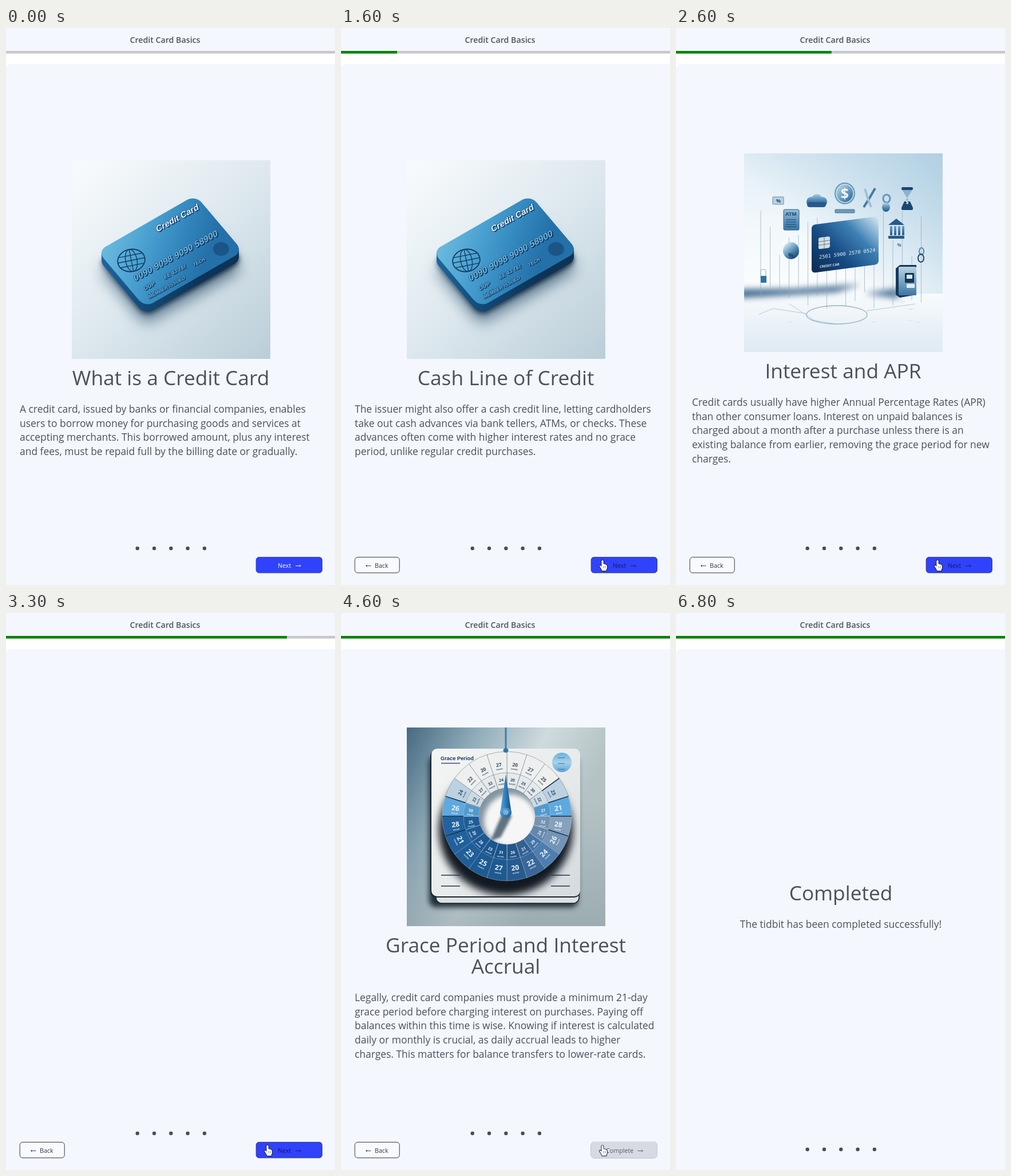
Write an HTML page with a canvas that moves like this. It is 575 by 973 pixels and loops after 7600 ms.

```html
<!DOCTYPE html>
<html lang="en">
<head>
<meta charset="utf-8">
<title>Credit Card Basics</title>
<style>
  html, body { margin: 0; width: 100%; height: 100%; overflow: hidden; background: #f4f7fe; }
  canvas { display: block; }
</style>
</head>
<body>
<canvas id="stage" width="575" height="973"></canvas>
<script>
const ctx = document.getElementById('stage').getContext('2d');
const LOOP = 7600, SIZE = 347, MID = 288, NAV = 28;
const INK = '#4c5159', PAGE = '#f4f7fe', NAVY = '#1a4672';
const SANS = '"Open Sans", "Noto Sans", sans-serif';
const BOLD = '"Liberation Sans", Arial, sans-serif';

const clamp = v => Math.max(0, Math.min(1, v));
const mix = (a, b, p) => a + (b - a) * p;
const ease = p => (1 - Math.cos(Math.PI * p)) / 2;
const span = (t, a, b) => clamp((t - a + 45) / (b - a + 45));

function seeded(seed) {
  return () => (seed = seed * 16807 % 2147483647) / 2147483647;
}
function text(g, s, x, y, font, color, align = 'left') {
  g.font = font;
  g.fillStyle = color;
  g.textAlign = align;
  g.fillText(s, x, y);
}
function grad(g, x0, y0, x1, y1, ...colors) {
  const f = g.createLinearGradient(x0, y0, x1, y1);
  colors.forEach((c, i) => f.addColorStop(i / (colors.length - 1), c));
  return f;
}
function paint(g, fill, stroke, width = 1) {
  if (fill) { g.fillStyle = fill; g.fill(); }
  if (stroke) { g.strokeStyle = stroke; g.lineWidth = width; g.stroke(); }
}
function trace(g, p) {
  g.beginPath();
  for (let i = 0; i < p.length; i += 2) g.lineTo(p[i], p[i + 1]);
}
function poly(g, fill, ...p) {
  trace(g, p);
  paint(g, fill);
}
function line(g, color, width, ...p) {
  trace(g, p);
  paint(g, null, color, width);
}
function oval(g, x, y, rx, ry, fill, stroke, width, turn = 0) {
  g.beginPath();
  g.ellipse(x, y, rx, ry, turn, 0, 7);
  paint(g, fill, stroke, width);
}
function box(g, x, y, w, h, r, fill, stroke, width) {
  g.beginPath();
  g.roundRect(x, y, w, h, r);
  paint(g, fill, stroke, width);
}
function at(g, x, y, draw, turn = 0) {
  g.save();
  g.translate(x, y);
  g.rotate(turn);
  draw();
  g.restore();
}
function blurred(g, px, draw) {
  g.save();
  g.filter = `blur(${px}px)`;
  draw();
  g.restore();
}

// Each picture is painted once, in its own square.
function picture(draw) {
  const c = document.createElement('canvas');
  c.width = c.height = SIZE;
  draw(c.getContext('2d'));
  return c;
}

function cardArt(g) {
  g.fillStyle = grad(g, 15, 14, 330, SIZE, '#f7fafc', '#dde8ee', '#bccfd9');
  g.fillRect(0, 0, SIZE, SIZE);

  // Card plane: x runs up to the right, y down to the right.
  const onCard = (dy, draw) => at(g, 45, 159 + dy, () => {
    g.transform(.855, -.49, .692, .817, 0, 0);
    draw();
  });
  const plate = (dy, ...colors) =>
    onCard(dy, () => box(g, 0, 0, 200, 120, 16, grad(g, 20, 0, 110, 125, ...colors)));
  blurred(g, 12, () => plate(32, 'rgba(40,84,116,.5)', 'rgba(20,56,88,.6)'));
  blurred(g, 4, () => plate(17, 'rgba(8,30,52,.5)', 'rgba(6,24,42,.85)'));
  for (let d = 13; d > 0; d--) plate(d, '#1d659c', '#0c3358');
  plate(0, '#68b8de', '#4ba2d1', '#3388be', '#2470a9');

  const emboss = (s, x, y, size, color = '#6fb2d9') => at(g, x, y, () => {
    g.transform(.87, -.48, .25, .95, 0, 0);
    text(g, s, 1.5, 2, `bold ${size}px ${BOLD}`, '#0c3159');
    g.lineWidth = 1.2;
    g.strokeStyle = '#164a78';
    g.strokeText(s, 0, 0);
    text(g, s, 0, 0, `bold ${size}px ${BOLD}`, color);
  });
  emboss('Credit Card', 149, 126, 15.5, '#eef7fc');
  emboss('0090 9098 9090 58900', 110, 212, 16.3);
  emboss('OUP', 127, 228, 10);
  emboss('EE 43 TEI', 162, 208, 9.5);
  emboss('TECH', 213, 186, 8.5);
  emboss('MEMBER ISSUED', 135, 242, 8.6);

  at(g, 104, 175, () => {
    const rim = '#123d66';
    oval(g, 0, 0, 24, 19.5, null, rim, 1.8);
    oval(g, 0, 0, 10, 19.5, null, rim, 1.4);
    line(g, rim, 1.4, 0, -19, 0, 19);
    for (const y of [-9, 0, 9]) {
      const w = 24 * Math.sqrt(1 - (y / 19.5) ** 2);
      line(g, rim, 1.4, -w, y, w, y);
    }
  }, -.2);
  oval(g, 261, 155, 14, 12, '#1b5587');
}

function feesArt(g) {
  const rand = seeded(11);
  g.fillStyle = grad(g, 0, 0, 0, SIZE, '#e2eef6', '#f1f7fb', '#fbfdfe', '#dfeaf3');
  g.fillRect(0, 0, SIZE, SIZE);
  g.fillStyle = grad(g, 150, 190, SIZE, 0, 'rgba(178,209,228,0)', '#b0d0e3');
  g.fillRect(0, 0, SIZE, 245);
  blurred(g, 6, () => {
    poly(g, 'rgba(28,78,122,.9)', -8, 238, 90, 237, 205, 229, 160, 242, -8, 252);
    poly(g, 'rgba(28,78,122,.8)', 210, 245, 270, 236, 270, 253);
  });

  for (let x = 29; x < 310; x += 16.5) line(g, '#8fa9ba', .7, x, 100 + 90 * rand(), x, 230 + 50 * rand());
  oval(g, 162, 282, 53, 16, null, '#8fb6c8', 1.3);
  line(g, '#a9bdca', .8, 26, 281, 51, 271, 109, 280);
  line(g, '#a9bdca', .8, 79, 263, 124, 292, 161, 298);
  line(g, '#a9bdca', .8, 214, 275, 299, 263);
  for (let i = 0; i < 8; i++)
    text(g, '· · ·', 30 + 270 * rand(), 260 + 45 * rand(), `6px ${SANS}`, '#587d98');

  const steel = (y, h) => grad(g, 0, y, 0, y + h, '#b8d6e8', '#4d88b5', NAVY);
  const sign = (s, size, color) => text(g, s, 0, size * .36, `bold ${size}px ${SANS}`, color, 'center');
  const rows = (n, y, w) => { for (let i = 0; i < n; i++) line(g, NAVY, 1.1, -w, y + i * 4, w, y + i * 4); };

  at(g, 60, 83, () => { box(g, -10, -7, 19, 13, 1, '#b9d2e0', '#5f8fae'); sign('%', 9, NAVY); });
  at(g, 82, 116, () => {
    box(g, -13, -18, 27, 36, 2, steel(-30, 75), '#2f6591');
    rows(4, 0, 9);
    g.translate(0, -10);
    sign('ATM', 9, NAVY);
  });
  at(g, 127, 83, () => {
    for (const x of [-9, 0, 9]) oval(g, x, 2 - 5 * Math.cos(x / 6), 9, 9, steel(-14, 26));
    box(g, -17, 2, 33, 9, 4.5, '#255b8b');
  });
  at(g, 82, 170, () => {
    oval(g, 0, 0, 14, 15, grad(g, -11, -13, 11, 13, '#e3eff5', '#5d97c0', '#123a64'));
    g.translate(0, 8);
    sign('%', 10, '#173e63');
  });
  at(g, 176, 70, () => {
    oval(g, 0, 0, 18, 19, '#6498bb');
    oval(g, 0, 0, 15, 16, grad(g, -13, -13, 13, 13, '#b7d5e7', '#2b6a9d'), '#d4e7f1', 1.5);
    sign('$', 25, '#f3f9fc');
    box(g, -17, 28, 34, 6, 1, '#6d99b7', '#44779d');
  });
  at(g, 218, 78, () => {
    line(g, '#47799f', 4, -9, 16, 0, 2, 11, -17);
    line(g, '#9dc2d8', 4, -7, -16, -2, 0, 4, 16);
  });
  at(g, 249, 86, () => { oval(g, 0, -7, 6, 7, null, '#6797b7', 3); oval(g, -1, 8, 7, 8, steel(0, 18)); });
  at(g, 285, 78, () => {
    poly(g, '#8bb3cc', -10, -16, 10, -16, 0, 0, 10, 18, -10, 18, 0, 0);
    poly(g, NAVY, -5, 6, 5, 6, 10, 17, -10, 17);
    for (const y of [-19, 16]) box(g, -10, y, 20, 5, 2, NAVY);
    g.translate(0, 8);
    sign('$', 9, '#eff7fb');
  });
  at(g, 266, 132, () => {
    poly(g, '#255a8a', -14, -7, 0, -18, 14, -7);
    for (let x = -11; x < 12; x += 7) box(g, x, -5, 4, 16, 0, steel(-16, 32));
    box(g, -14, 12, 28, 5, 1, '#255a8a');
    g.translate(5, 28);
    sign('%', 8, '#4d7594');
  });
  at(g, 309, 177, () => { oval(g, 1, -6, 4, 6, null, '#5188ae', 2); oval(g, 0, 6, 5, 7, null, NAVY, 2); });
  at(g, 34, 219, () => { box(g, -5, -16, 9, 17, 2, null, '#8db1c6'); box(g, -5, -5, 10, 12, 1, '#2f70a1'); });
  at(g, 284, 223, () => {
    poly(g, '#143659', -19, -22, -12, -28, 17, -28, 17, 24, -12, 29, -19, 24);
    box(g, -14, -25, 31, 50, 2, grad(g, 0, -25, 0, 25, '#b7d4e4', '#3f76a3'));
    box(g, -3, -14, 16, 17, 1, '#123657');
    box(g, 0, -11, 10, 7, 0, '#dceaf2');
    box(g, 0, 5, 14, 7, 1, '#e1edf4');
  });

  at(g, 118, 125, () => {
    g.transform(1, -.13, 0, 1, 0, 0);
    box(g, 0, 0, 117, 84, 6, grad(g, 10, 84, 110, -5, '#0d2f57', '#164a82', '#3d80b4', '#d3e8f3'));
    box(g, 12, 24, 20, 20, 3, '#d5dfe4');
    for (const y of [31, 37]) line(g, '#647c8d', 1, 12, y, 32, y);
    line(g, '#647c8d', 1, 22, 24, 22, 44);
    text(g, '2501 5900 2570 0524', 13, 61, '8.6px "DejaVu Sans Mono", monospace', '#eaf3f9');
    text(g, 'CREDIT CAR', 14, 77, `bold 6px ${SANS}`, '#dcebf5');
  });
}

function wheelTone(a) {
  const c = Math.cos(a), s = Math.sin(a);
  if (c > .55) return '#eef0ef';
  if (c > 0) return `hsl(205 ${mix(80, 35, c * 2)}% ${mix(52, 84, c * 2)}%)`;
  if (s < 0) return `hsl(209 66% ${34 + 4 * s * s}%)`;
  return `hsl(210 ${62 - 34 * s}% ${35 + 29 * s * s}%)`;
}

function wheelArt(g) {
  const cx = 175, cy = 155, count = 20, step = 2 * Math.PI / count;
  const rule = '#1c3550';
  g.fillStyle = grad(g, 0, 0, 300, 150, '#466a81', '#8fabb9', '#cfdadd', '#b4c2c5');
  g.fillRect(0, 0, SIZE, SIZE);
  g.fillStyle = grad(g, 0, 130, 0, SIZE, 'rgba(120,140,148,0)', 'rgba(120,140,148,.4)');
  g.fillRect(0, 0, SIZE, SIZE);

  blurred(g, 5, () => box(g, 39, 50, 260, 264, 12, 'rgba(10,25,36,.85)'));
  box(g, 51, 50, 250, 257, 10, '#dce2e4', '#17242e', 1.5);
  box(g, 41, 40, 262, 257, 10, '#19262f');
  g.save();
  box(g, 43, 37, 260, 258, 10, grad(g, 43, 37, 303, 295, '#f4f5f5', '#e9ecec', '#d4dadd'));
  g.clip();
  blurred(g, 7, () => oval(g, cx - 2, cy + 24, 117, 114, 'rgba(8,14,24,.95)'));
  g.restore();
  for (const y of [258, 277])
    for (const x of [60, 252]) line(g, rule, 1.5, x, y, x + 33, y);
  text(g, 'Grace Period', 59, 57, `bold 9.3px ${BOLD}`, '#1b3458');
  line(g, '#2c507c', 1.6, 60, 62.5, 93, 62.5);
  oval(g, 271, 61, 17, 17, grad(g, 0, 44, 0, 78, '#6bb3de', '#a6d2ea', '#5da6d6'));
  for (const y of [53, 63, 73]) line(g, '#225a8b', .8, 264, y, 276, y);

  const cell = (k, r0, r1, fill, stroke) => {
    const a = k * step - Math.PI / 2;
    g.beginPath();
    g.arc(cx, cy, r1, a, a + step);
    g.arc(cx, cy, r0, a + step, a, true);
    g.closePath();
    paint(g, fill, stroke, .8);
  };
  const label = (s, a, r, turn, size, color) =>
    at(g, cx + r * Math.sin(a), cy - r * Math.cos(a), () => {
      text(g, s, 0, size * .36, `bold ${size}px ${SANS}`, color, 'center');
      text(g, 'month', 0, size * .36 + 6, `bold 3.5px ${SANS}`, color, 'center');
    }, turn);
  for (let k = 0; k < count; k++) {
    const a = (k + .5) * step, c = Math.cos(a), s = Math.sin(a), pale = c > .4;
    const edge = pale ? '#8d989f' : 'rgba(225,238,248,.4)';
    cell(k, 49, 113, wheelTone(a), edge);
    cell(k, 49, 76, pale ? 'rgba(222,228,231,.5)' : 'rgba(14,60,108,.14)', edge);
    // Keep every number readable: radial above and below, level at the sides.
    const turn = Math.abs(c) < .35 ? a - Math.sign(s) * Math.PI / 2 : c < 0 ? a - Math.PI : a;
    const color = pale ? '#34465a' : '#eaf4fb';
    label(20 + k * 7 % 9, a, 91, turn, pale ? 8.5 : 12, color);
    label(20 + k * 5 % 13, a, 64, turn, 7, color);
    if (Math.abs(c) < .65) {
      const x = Math.sin(k * step), y = -Math.cos(k * step);
      if (y < .4) line(g, '#14283c', 1.4, cx + 76 * x, cy + 76 * y, cx + 113 * x, cy + 113 * y);
    }
  }

  g.save();
  oval(g, cx, cy, 49, 49, '#8496a1');
  g.clip();
  blurred(g, 4, () => oval(g, cx + 6, cy + 8, 46, 46, '#f5f6f5'));
  blurred(g, 2, () => poly(g, 'rgba(70,90,106,.85)', 167, 150, 184, 154, 164, 192, 146, 198));
  g.restore();
  line(g, '#3a7eb3', 3, 173, 0, 173, 40);
  oval(g, 173, 40, 4.5, 4, '#2f75ad');
  poly(g, grad(g, 164, 0, 183, 0, '#58a5d7', '#2c78b6', '#174d83'), 173, 82, 183, 150, 163, 150);
  oval(g, 173, 149, 10, 9, grad(g, 165, 140, 181, 158, '#62abd9', '#1c5b96'));
  oval(g, 173, 148, 5, 4.5, '#71b3dd');
}

const card = picture(cardArt);
const slides = [
  { in: [-900, -800], out: [600, 700], gain: 0, art: card,
    title: ['What is a Credit Card'],
    body: ['A credit card, issued by banks or financial companies, enables',
      'users to borrow money for purchasing goods and services at',
      'accepting merchants. This borrowed amount, plus any interest',
      'and fees, must be repaid full by the billing date or gradually.'] },
  { in: [1000, 1600], out: [2000, 2100], gain: 98, art: card,
    title: ['Cash Line of Credit'],
    body: ['The issuer might also offer a cash credit line, letting cardholders',
      'take out cash advances via bank tellers, ATMs, or checks. These',
      'advances often come with higher interest rates and no grace',
      'period, unlike regular credit purchases.'] },
  { in: [2300, 3000], out: [3300, 3300], gain: 393, art: picture(feesArt),
    title: ['Interest and APR'],
    body: ['Credit cards usually have higher Annual Percentage Rates (APR)',
      'than other consumer loans. Interest on unpaid balances is',
      'charged about a month after a purchase unless there is an',
      'existing balance from earlier, removing the grace period for new',
      'charges.'] },
  { in: [3600, 4100], out: [6000, 6000], gain: 84, art: picture(wheelArt),
    title: ['Grace Period and Interest', 'Accrual'],
    body: ['Legally, credit card companies must provide a minimum 21-day',
      'grace period before charging interest on purchases. Paying off',
      'balances within this time is wise. Knowing if interest is calculated',
      'daily or monthly is crucial, as daily accrual leads to higher',
      'charges. This matters for balance transfers to lower-rate cards.'] },
  { in: [6300, 6800], out: [LOOP, LOOP], gain: 0,
    title: ['Completed'],
    body: ['The tidbit has been completed successfully!'] }
];
const [, second, , last, finish] = slides;

// The block of picture, title and body is centred in the panel.
function drawSlide(s, t) {
  const p = span(t, ...s.in);
  const alpha = clamp(p * 2.2) * (1 - span(t, ...s.out));
  if (alpha <= 0) return;
  const titleStep = 37, bodyStep = 24.7, artSize = s.art ? SIZE : 0;
  const height = artSize + s.title.length * titleStep + s.body.length * bodyStep;
  const top = Math.round((s.art ? 472.4 : 472.4 + NAV / 2) - height / 2);
  const titleY = top + artSize + 46, bodyY = titleY + 11 + s.title.length * titleStep;
  const [x, align] = s.art ? [24, 'left'] : [MID, 'center'];
  ctx.save();
  ctx.globalAlpha = alpha;
  ctx.translate(7.2 * (1 - ease(p)), 0);
  if (s.art) ctx.drawImage(s.art, 115, top);
  s.title.forEach((l, i) => text(ctx, l, MID, titleY + i * titleStep, `35.3px ${SANS}`, INK, 'center'));
  s.body.forEach((l, i) => text(ctx, l, x, bodyY + i * bodyStep, `17.45px ${SANS}`, INK, align));
  ctx.restore();
}

function arrow(x, y, dir, color) {
  line(ctx, color, .9, x - 4.5, y, x + 4.5, y);
  line(ctx, color, .9, x + dir * 2.5, y - 2, x + dir * 4.5, y, x + dir * 2.5, y + 2);
}

function drawButtons(t) {
  const font = `10.7px ${SANS}`, dark = '#33373d';
  if (t >= second.in[0]) {
    box(ctx, 24.2, 924.4, 78, 27.4, 5, '#f8faff', dark);
    arrow(48, 939.5, -1, dark);
    text(ctx, 'Back', 59, 943, font, dark);
  }
  const hover = clamp((t - 100) / 200), done = span(t, 4500, 4600);
  box(ctx, 437.2, 924.4, 115.2, 27.4, 5, '#3042fb', `rgb(38,52,${mix(205, 140, hover)})`);
  ctx.save();
  ctx.globalAlpha = done;
  box(ctx, 436.7, 924, 116.2, 28.2, 5, '#d5dae3');
  ctx.restore();
  const color = done > .5 ? '#555b64' : `rgb(${mix(255, 20, hover)},${mix(255, 30, hover)},${mix(255, 92, hover)})`;
  const [label, x, tip] = t < last.in[0] ? ['Next', 475, 510.5] : ['Complete', 463, 523];
  text(ctx, label, x, 943, font, color);
  arrow(tip, 939.5, 1, color);
}

const hand = new Path2D('M-1.6 1.6Q0-1 1.6 1.6V6.6L6 7.8Q8.2 8.6 8 11V14Q6.8 16 6.6 18.5H-.6Q-2 15-5 11Q-5.6 8.6-3.4 9.4L-1.6 11.4Z');
function drawCursor(t) {
  if (t < 100) return;
  const enter = 1 - clamp(t / 300), leave = ease(clamp((t - 5400) / 400));
  at(ctx, 457 + 12 * enter + 64 * leave, 929.5 - 45 * enter - 5 * leave, () => {
    ctx.lineWidth = 1.8;
    ctx.strokeStyle = '#15181f';
    ctx.fillStyle = '#fff';
    ctx.stroke(hand);
    ctx.fill(hand);
    for (const x of [2, 5]) line(ctx, '#555b66', .8, x, 10.5, x, 14);
  });
}

function draw(t) {
  ctx.fillStyle = PAGE;
  ctx.fillRect(0, 0, 575, 973);
  text(ctx, 'Credit Card Basics', 278, 26, `600 14.2px ${SANS}`, '#50555d', 'center');
  ctx.fillStyle = '#fff';
  ctx.fillRect(0, 44, 575, 31);
  ctx.fillStyle = '#c8c8ca';
  ctx.fillRect(0, 40, 575, 4.6);
  ctx.fillStyle = '#078407';
  ctx.fillRect(0, 40, slides.reduce((w, s) => w + s.gain * ease(span(t, ...s.in)), 0), 4.6);
  box(ctx, 0, 63, 585, 920, 8, PAGE);

  slides.forEach(s => drawSlide(s, t));
  const ended = t >= finish.in[0];
  for (let i = -2; i <= 2; i++) oval(ctx, 288.3 + i * 29.3, ended ? 909 + NAV : 909, 3.2, 3.2, '#494e55');
  if (!ended) {
    drawButtons(t);
    drawCursor(t);
  }
}

const start = performance.now();
function tick() {
  const t = (performance.now() - start) % LOOP;
  draw(Math.floor(t / 100) * 100);
  requestAnimationFrame(tick);
}
tick();
</script>
</body>
</html>
```
